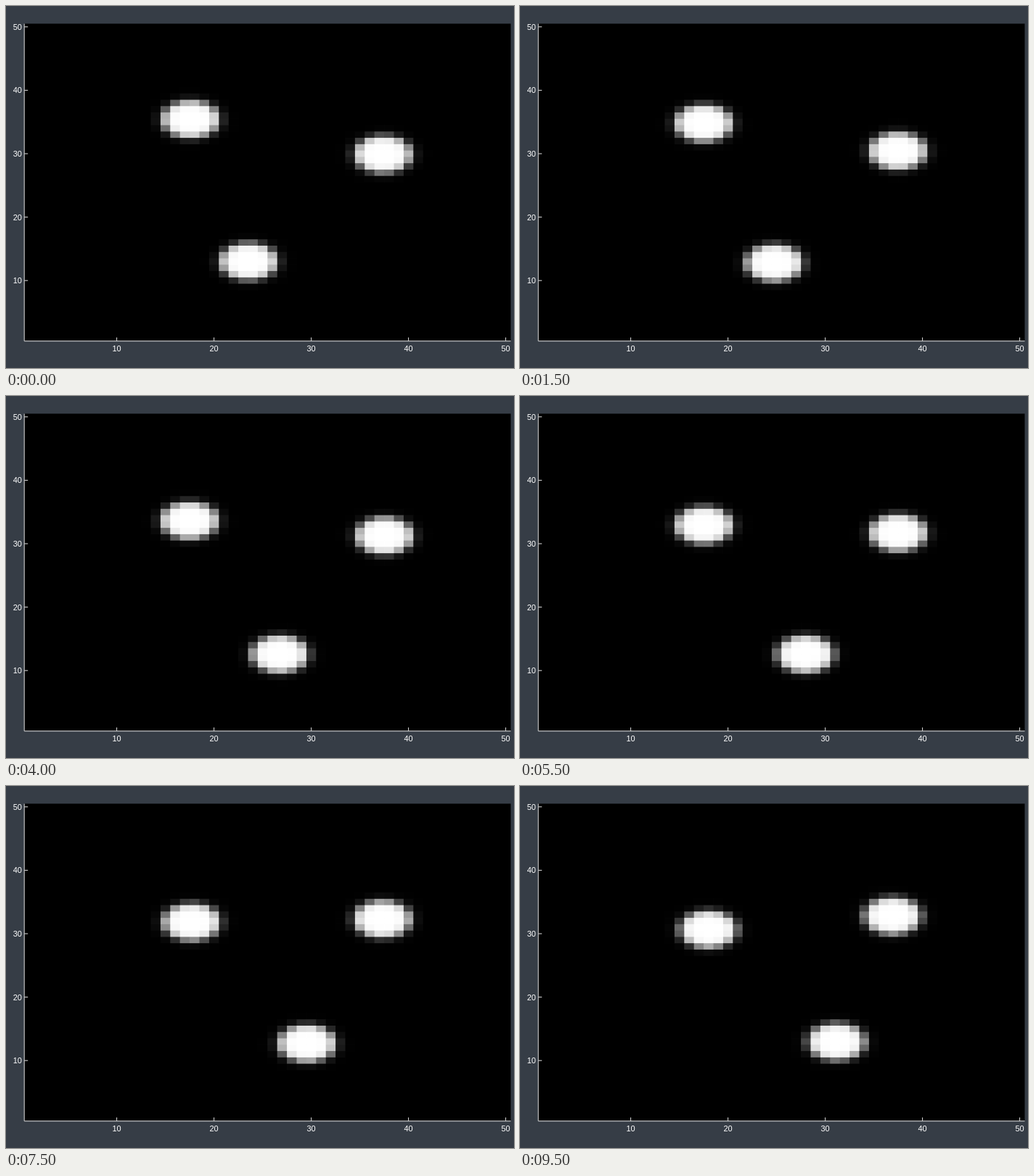
Animation, 700 px wide and 500 px high, one loop 10 s. Source, as an HTML page with a canvas:

```html
<!DOCTYPE html>
<html>
<head>
<meta charset="utf-8">
<style>
  html, body { margin: 0; width: 100%; height: 100%; overflow: hidden; background: #363d46; }
  canvas, svg { position: absolute; left: 0; top: 0; width: 700px; height: 500px; }
  text { font: 11px "Liberation Sans", Arial, sans-serif; fill: #fff; }
  line { stroke: #e0e0e0; stroke-width: 1; }
</style>
</head>
<body>
<canvas id="heat" width="700" height="500"></canvas>
<svg id="axes" viewBox="0 0 700 500"></svg>
<script>
const SIZE = 50, STEP = 500, STEPS = 20;
const RADIUS = 2.89, SHARPNESS = 3.6;
const CELL_W = 13.4, CELL_H = 8.76;

const px = v => 152.6 + (v - 10) * CELL_W;
const py = v => 379.2 - (v - 10) * CELL_H;

// Paths of the ball centres in grid units, s being the step.
const paths = [
  s => [17.465 + 0.0033 * (s - 6.5) ** 2, 35.42 - 0.2 * s - 0.0026 * s * s],
  s => [37.383 + 0.0277 * s - 0.000142 * s ** 3, 29.9 + 0.18 * s - 0.0014 * s * s],
  s => [23.56 + 0.4 * s, 12.56 + 0.0047 * (s - 9.8) ** 2]
];

const axes = document.getElementById("axes");
const ctx = document.getElementById("heat").getContext("2d");

function add(name, attrs) {
  const el = document.createElementNS("http://www.w3.org/2000/svg", name);
  for (const key in attrs) el.setAttribute(key, attrs[key]);
  return axes.appendChild(el);
}

function line(x1, y1, x2, y2) {
  add("line", { x1, y1, x2, y2 });
}

function label(text, x, y, anchor) {
  add("text", { x, y, "text-anchor": anchor }).textContent = text;
}

function drawAxes() {
  const left = 25.2, bottom = 462.8;
  line(left, bottom, 695.5, bottom);
  line(left, 24.5, left, bottom);
  for (let v = 10; v <= SIZE; v += 10) {
    line(px(v), bottom - 5, px(v), bottom);
    line(left, py(v), left + 5, py(v));
    label(v, px(v), 477, "middle");
    label(v, 22, py(v) + 4, "end");
  }
}

function brightness(col, row, centres) {
  let sum = 0;
  for (const [x, y] of centres) {
    const r = Math.hypot(col - x, row - y);
    sum += 1 / (1 + Math.exp(SHARPNESS * (r - RADIUS)));
  }
  return Math.round(255 * Math.min(sum, 1));
}

function draw(step) {
  const centres = paths.map(path => path(step));
  ctx.clearRect(0, 0, 700, 500);
  ctx.globalCompositeOperation = "source-over";
  ctx.fillStyle = "#000";
  ctx.fillRect(25, py(SIZE + 0.5), 670.5, SIZE * CELL_H);

  // Adding light blends the shared edges of neighbouring cells without seams.
  ctx.globalCompositeOperation = "lighter";
  for (let row = 1; row <= SIZE; row++) {
    for (let col = 1; col <= SIZE; col++) {
      const level = brightness(col, row, centres);
      if (!level) continue;
      ctx.fillStyle = `rgb(${level},${level},${level})`;
      ctx.fillRect(px(col - 0.5), py(row + 0.5), CELL_W, CELL_H);
    }
  }
}

const start = performance.now();
let shown = -1;
function tick() {
  const step = Math.floor((performance.now() - start) / STEP) % STEPS;
  if (step !== shown) draw(shown = step);
  requestAnimationFrame(tick);
}
drawAxes();
tick();
</script>
</body>
</html>
```
